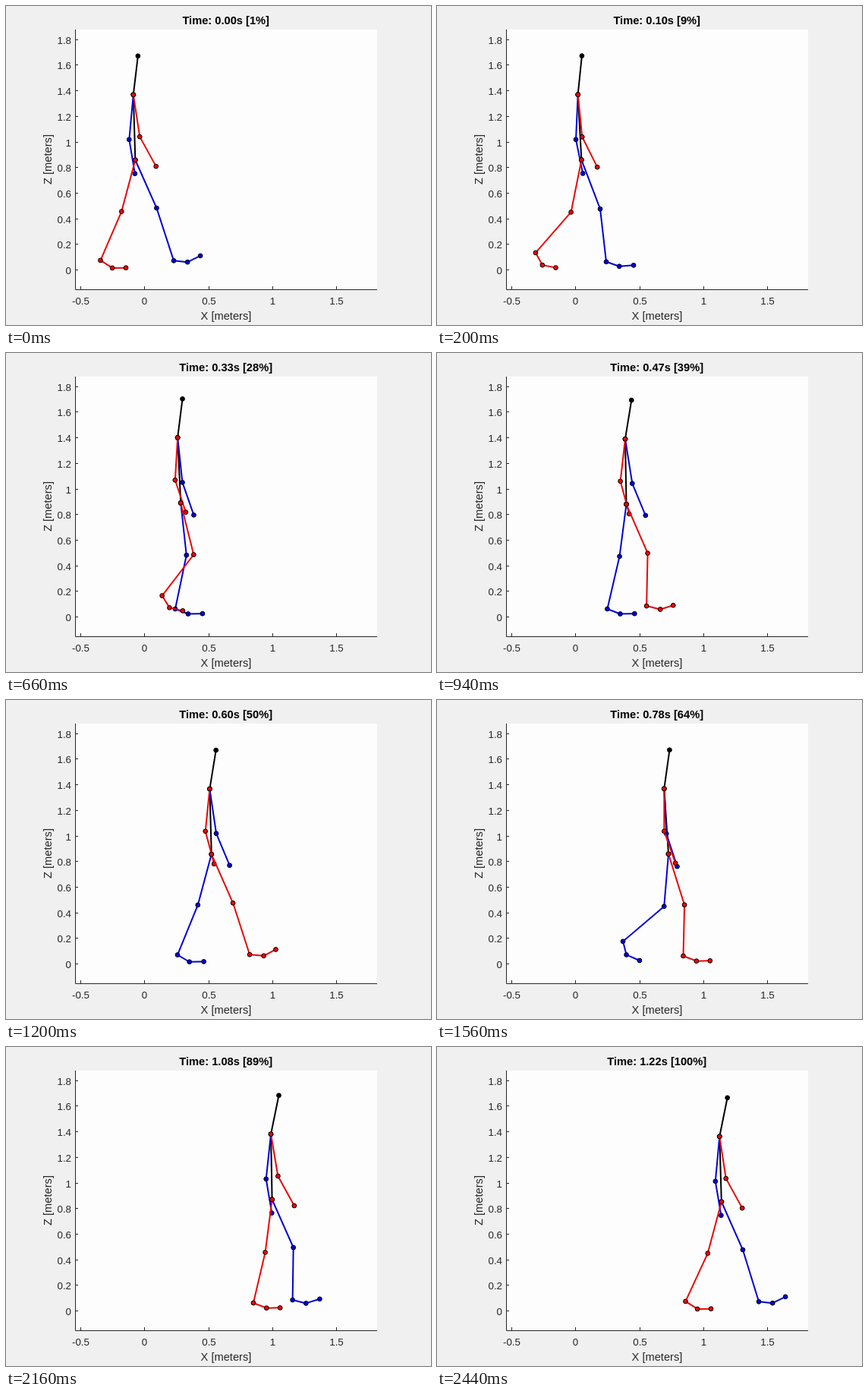
An HTML page for the animation above (2460 ms loop, 560 by 420 pixels).

```html
<!DOCTYPE html>
<html lang="en">
<head>
<meta charset="utf-8">
<title>Walking stick figure</title>
<style>
html, body { margin: 0; width: 100%; height: 100%; overflow: hidden; background: #f0f0f0; }
svg { display: block; width: 560px; height: 420px; }
text { font-family: "Liberation Sans", Arial, sans-serif; font-size: 13.33px; fill: #262626; text-anchor: middle; }
.label { font-size: 14.67px; }
.title { font-size: 14.67px; font-weight: bold; fill: #000; }
.axis { fill: none; stroke: #262626; stroke-width: 1; }
.bone { fill: none; stroke-width: 2; stroke-linejoin: round; }
.joint { stroke: #000; stroke-width: 1; }
</style>
</head>
<body>
<svg viewBox="0 0 560 420">
  <rect x="91" y="31" width="398" height="343" fill="#fdfdfd"/>
  <g id="axes"></g>
  <text class="label" x="290" y="413">X [meters]</text>
  <text class="label" transform="translate(59.5 202) rotate(-90)">Z [meters]</text>
  <text class="title" id="title" x="289.7" y="24"></text>
  <g id="figure" transform="translate(.5 .5)"></g>
</svg>
<script>
const STEP = 20, COUNT = 123;   // ms per step, steps per loop
const CYCLE = 122;              // steps in one full stride
const STRIDE = 203;             // pixels a foot travels per stride
const TAU = 2 * Math.PI;
const NS = 'http://www.w3.org/2000/svg';
const $ = id => document.getElementById(id);

function add(parent, tag, attrs, text) {
  const el = document.createElementNS(NS, tag);
  for (const k in attrs) el.setAttribute(k, attrs[k]);
  if (text !== undefined) el.textContent = text;
  parent.appendChild(el);
  return el;
}

function drawAxes() {
  const g = $('axes');
  let d = 'M91.5 31V373.5H489';
  for (let i = 0; i < 5; i++) {
    const x = Math.round(98 + i * 84.25);
    d += `M${x + 0.5} 373v-4`;
    add(g, 'text', { x: x + 0.5, y: 393 }, String(i / 2 - 0.5));
  }
  for (let i = 0; i < 10; i++) {
    const y = Math.round(347 - i * 33.7);
    d += `M91 ${y + 0.5}h4`;
    add(g, 'text', { x: 86, y: y + 5.5, style: 'text-anchor:end' }, String(i / 5));
  }
  add(g, 'path', { class: 'axis', d });
}

// Motion helpers: n counts steps within the stride
const wave = (n, peak, period = CYCLE) => Math.cos(TAU * (n - peak) / period);

function smooth(u) {
  u = Math.min(1, Math.max(0, u));
  return u * u * (3 - 2 * u);
}

function bump(n, peak, half) {
  const d = (n - peak) - CYCLE * Math.round((n - peak) / CYCLE);
  return Math.abs(d) < half ? Math.cos(d / half * Math.PI / 2) ** 2 : 0;
}

// Segment ends: by sideways reach below a joint, or by angle in degrees
const hang = ([x, y], dx, len) => [x + dx, y + Math.sqrt(len * len - dx * dx)];

function turn([x, y], deg, len) {
  const a = deg * Math.PI / 180;
  return [x + len * Math.cos(a), y + len * Math.sin(a)];
}

function trunkPose(n) {
  const p = n / CYCLE, sway = Math.sin(TAU * p), half = CYCLE / 2;
  const hip = [
    172 + 204.5 * p + 3 * wave(n, 23, half) + 0.9 * sway,
    200 + p - 2.7 * wave(n, 36, half) - 0.8 * sway
  ];
  const tilt = wave(n, 20, half);
  const neck = [hip[0] - 3.6 - 2.2 * tilt, hip[1] - 86];
  const head = [neck[0] + 5.5 + 4.3 * p - 1.2 * tilt, neck[1] - 51];
  return [hip, neck, head];
}

function armPose(neck, n, side) {
  const elbow = hang(neck, 1.5 + 8 * wave(n, 112), side.upper);
  return [neck, elbow, hang(elbow, side.bend + 5.3 * wave(n, 115), side.fore)];
}

function legPose(hip, n, side) {
  const t = (n + side.shift * CYCLE) % CYCLE;
  const strides = Math.floor(n / CYCLE + side.shift) - side.shift;
  const a = TAU * t / CYCLE;
  const reach = 8.5 - 23.1 * Math.cos(a) + 1.8 * Math.sin(a)
    - 3.5 * Math.cos(2 * a) - 1.5 * Math.sin(2 * a);
  const strike = bump(t, 56, 19);
  const swing = smooth((t / 64) ** 1.25);
  const roll = smooth((t - 95) / 27);
  const ankle = [
    124 + STRIDE * strides + (STRIDE - 3) * swing + 3 * roll,
    336.5 - 22 * bump(t, 24, 30) - 2 * strike
  ];
  const ball = turn(ankle, 21 + 57 * bump(t, 21, 30) - 18 * strike, side.foot);
  const toe = turn(ball, -1 + 28 * bump(t, 22, 22) - 30 * strike, side.toe);
  return [hip, hang(hip, reach, side.thigh), ankle, ball, toe];
}

function chain(color, count) {
  const g = $('figure');
  const line = add(g, 'polyline', { class: 'bone', stroke: color });
  const dots = Array.from({ length: count }, () =>
    add(g, 'circle', { class: 'joint', r: 2.9, fill: color }));
  return points => {
    line.setAttribute('points', points.map(p => p.map(c => c.toFixed(2)).join()).join(' '));
    points.forEach(([x, y], i) => {
      dots[i].setAttribute('cx', x.toFixed(2));
      dots[i].setAttribute('cy', y.toFixed(2));
    });
  };
}

drawAxes();
const drawTrunk = chain('#000', 3);
const sides = [
  { color: '#0000d8', shift: 0.5, bend: 12.5, upper: 59.3, fore: 45.5, thigh: 69.2, foot: 18.2, toe: 18.9 },
  { color: '#ea0606', shift: 0, bend: 16.5, upper: 56, fore: 44.5, thigh: 70.2, foot: 18.6, toe: 17.9 }
].map(s => ({ ...s, drawArm: chain(s.color, 3), drawLeg: chain(s.color, 5) }));

function draw(n) {
  const [hip, neck, head] = trunkPose(n);
  drawTrunk([hip, neck, head]);
  for (const side of sides) {
    side.drawArm(armPose(neck, n + side.shift * CYCLE, side));
    side.drawLeg(legPose(hip, n, side));
  }
  const percent = Math.round((n + 1) / COUNT * 100);
  $('title').textContent = `Time: ${(n / 100).toFixed(2)}s [${percent}%]`;
}

function tick() {
  draw(Math.floor(performance.now() / STEP) % COUNT);
  requestAnimationFrame(tick);
}
tick();
</script>
</body>
</html>
```
